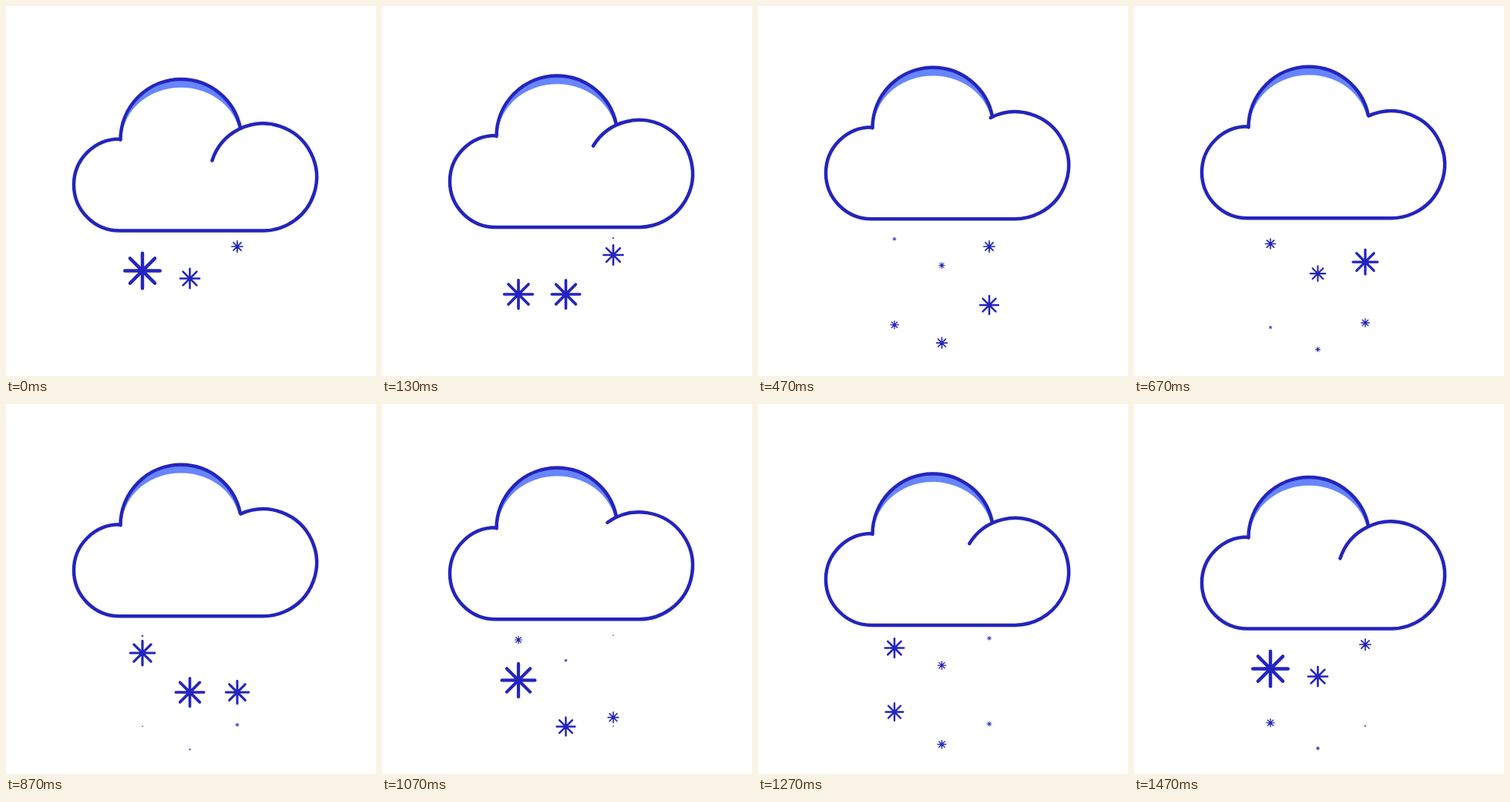
Write an HTML page with a canvas that moves like this. It is 480 by 480 pixels and loops after 1.5 s.

```html
<!DOCTYPE html>
<html lang="en">
<head>
<meta charset="utf-8">
<title>Snow cloud</title>
<style>
  html, body { margin: 0; width: 100%; height: 100%; overflow: hidden; background: #fff; }
  canvas { display: block; width: 480px; height: 480px; }
</style>
</head>
<body>
<canvas id="stage" width="480" height="480"></canvas>
<script>
const ctx = document.getElementById('stage').getContext('2d');
const LINE = '#2424be', SHADE = '#6685ff';
const LOOP = 1500, FPS = 30, LIFE = 47;
const RAD = Math.PI / 180;

// Fall distance and arm length of a flake, one point every four ticks
const STEP = 4;
const FALL = [0, 2.2, 6, 12, 23, 43.5, 74, 99.5, 111, 115, 117, 118, 118];
const SIZE = [0.5, 2, 4.2, 8, 13.9, 20, 16.2, 10, 6, 3.5, 1.8, 0.6, 0.4];

const COLUMNS = [
  { x: 177, y: 300, scale: 1.25, births: [-20, 10, 24] },
  { x: 238.5, y: 330.5, scale: 1, births: [-16, 6, 28] },
  { x: 300, y: 300, scale: 1, births: [-12, 2, 32] }
];

const clamp = v => Math.max(0, Math.min(1, v));

// Catmull-Rom through evenly spaced points
function sample(points, age) {
  const i = Math.floor(age / STEP), u = age / STEP - i;
  const at = k => points[Math.max(0, Math.min(points.length - 1, k))];
  const a = at(i - 1), b = at(i), c = at(i + 1), d = at(i + 2);
  return b + 0.5 * u * (c - a + u * (2 * a - 5 * b + 4 * c - d + u * (3 * (b - c) + d - a)));
}

// 0 when the cloud is down, 1 when it is up
function lift(tick) {
  const up = clamp(tick / 17), down = clamp((tick - 26) / 18.5);
  return up * (1 + up - up * up) - down * down * (3 - 2 * down);
}

function drawCloud(p) {
  ctx.save();
  ctx.translate(0, -16.2 * p);

  ctx.fillStyle = SHADE;
  ctx.beginPath();
  ctx.arc(227, 173.5, 78.5, 180 * RAD, 349 * RAD);
  ctx.ellipse(227, 173.5, 76.6, 67.8, 0, 349 * RAD, 180 * RAD, true);
  ctx.fill();

  ctx.lineWidth = 4.5;
  ctx.beginPath();
  ctx.arc(333.5, 222, 69.5, (198 + 47.5 * p) * RAD, 450 * RAD);
  ctx.arc(147.5, 232, 59.5, 90 * RAD, 270 * RAD);
  ctx.lineTo(148.7, 172.8);
  ctx.arc(227, 173.5, 78.5, 180 * RAD, 348.5 * RAD);
  ctx.stroke();
  ctx.restore();
}

function drawFlake(x, y, size) {
  const width = size * 0.16 + 0.4;
  const arm = Math.max(0.1, size - width / 2);
  ctx.lineWidth = width;
  ctx.beginPath();
  for (let i = 0; i < 4; i++) {
    const dx = arm * Math.cos(i * 45 * RAD), dy = arm * Math.sin(i * 45 * RAD);
    ctx.moveTo(x - dx, y - dy);
    ctx.lineTo(x + dx, y + dy);
  }
  ctx.stroke();
}

function draw(now) {
  const tick = Math.floor((now % LOOP) * FPS / 1000 + 0.11) % 45;
  ctx.clearRect(0, 0, 480, 480);
  ctx.strokeStyle = LINE;
  ctx.lineCap = ctx.lineJoin = 'round';
  drawCloud(lift(tick));
  for (const { x, y, scale, births } of COLUMNS) {
    for (const birth of births) {
      const age = tick - birth;
      if (age >= 0 && age < LIFE) {
        drawFlake(x, y + sample(FALL, age), scale * sample(SIZE, age));
      }
    }
  }
}

const start = performance.now();
function loop() {
  draw(performance.now() - start);
  requestAnimationFrame(loop);
}
loop();
</script>
</body>
</html>
```
